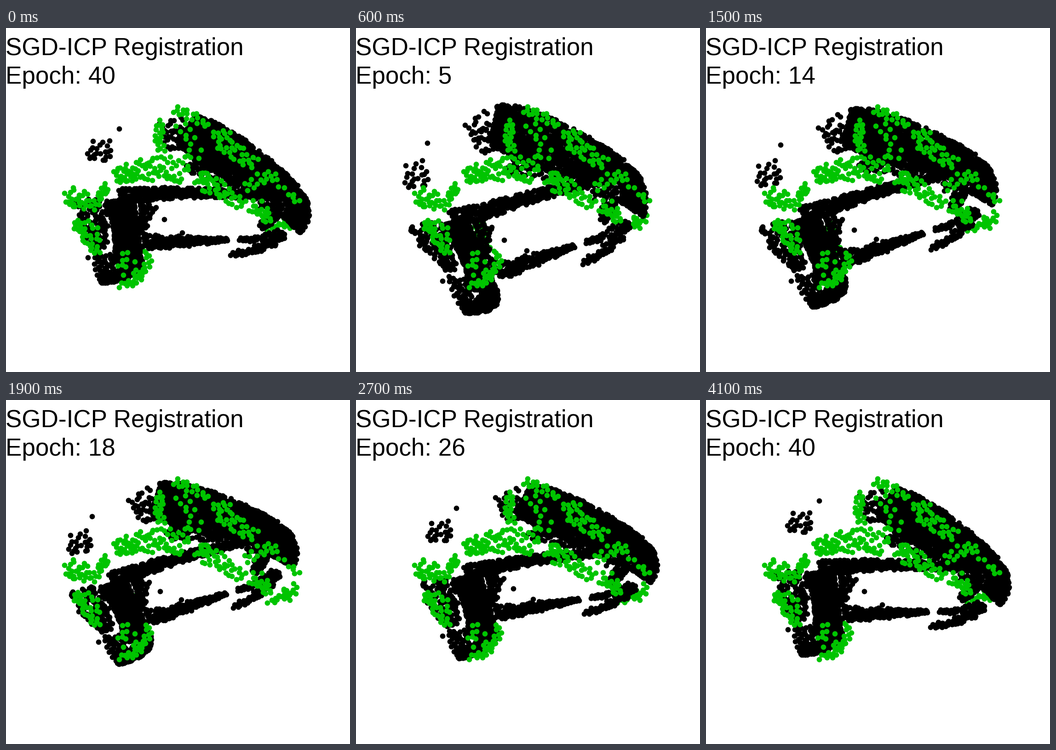
A matplotlib script for the animation above (4200 ms loop, 748 by 748 pixels).

```python
import numpy as np
import matplotlib.pyplot as plt
from matplotlib.animation import FuncAnimation

SIZE, DPI = 748, 100
LAST_EPOCH = 40
FRAMES, INTERVAL = LAST_EPOCH + 2, 100
GREEN = "#00c400"
PIVOT = np.array([400, 350])
GOLDEN = 0.618034
rng = np.random.default_rng(11)


def band(n, a, b, c, *widths):
    """Spread n points evenly over a ribbon through a, b and c.

    One half width holds throughout; three give it at a, b and c.
    """
    k = np.arange(n)
    t = (k + rng.random(n)) / n
    u = 2 * ((k * GOLDEN + 0.3 * rng.random(n)) % 1) - 1
    nodes = np.array([a, b, c], float)
    width = np.array(widths * 3 if len(widths) == 1 else widths, float)
    shape = np.column_stack([(1 - t) * (1 - 2 * t), 4 * t * (1 - t), t * (2 * t - 1)])
    slope = np.column_stack([4 * t - 3, 4 - 8 * t, 4 * t - 1]) @ nodes
    normal = slope[:, ::-1] * (1, -1) / np.hypot(*slope.T)[:, None]
    return shape @ nodes + normal * (u * (shape @ width))[:, None]


def depth(pts):
    """Only the lower left of the cloud stands out from the plane."""
    x, y = pts.T
    return 60 * np.clip((330 - x) / 150, 0, 1) * np.clip((y - 300) / 150, 0, 1)


# The moving cloud in its final pose
cloud = np.vstack([
    band(1400, (392, 219), (495, 283), (626, 361), 37, 47, 20),      # body
    band(45, (340, 237), (366, 231), (392, 225), 28, 32, 36),
    band(60, (400, 292), (450, 320), (560, 352), 18, 16, 8),
    band(550, (621, 362), (635, 396), (620, 428), 19, 25, 26),       # right end
    band(42, (552, 433), (575, 412), (602, 395), 10, 14, 16),
    band(18, (548, 386), (575, 386), (605, 385), 9),
    band(320, (245, 367), (400, 358), (600, 367), 19, 11, 9),        # ridge
    band(850, (246, 372), (260, 440), (264, 510), 32, 27, 30),       # column
    band(260, (278, 500), (264, 528), (206, 553), 16, 16, 3),        # foot
    band(58, (214, 490), (213, 522), (212, 548), 22, 20, 10),
    band(130, (184, 370), (190, 420), (206, 478), 35, 33, 14),       # flank
    band(42, (312, 380), (302, 405), (292, 448), 24, 14, 10),
    band(150, (297, 464), (380, 464), (482, 460), 16, 12, 3),        # strand
    band(55, (487, 491), (560, 475), (606, 447), 6, 9, 10),          # hook
    band(30, (505, 457), (550, 456), (600, 440), 4, 8, 10),
    band(22, (176, 280), (203, 264), (230, 262), 8, 26, 26),         # ear
    [(246, 219), (344, 416), (178, 499), (383, 445), (333, 208), (404, 315)],
])
lift = depth(cloud)

# The fixed cloud, in front of the moving one and behind it
front = np.vstack([
    band(18, (365, 175), (400, 190), (442, 212), 8, 11, 6),          # crown
    band(18, (340, 203), (332, 235), (341, 270), 9),
    band(11, (374, 208), (395, 238), (422, 282), 16),
    band(36, (464, 222), (490, 262), (545, 300), 16, 26, 16),
    band(80, (236, 322), (310, 306), (400, 308), 16, 26, 30),        # middle
    band(18, (220, 345), (205, 362), (190, 396), 10),
    band(28, (127, 372), (155, 370), (178, 390), 14, 24, 10),        # left
    band(36, (146, 430), (180, 445), (198, 492), 10, 22, 8),
    band(46, (415, 325), (455, 348), (518, 386), 14, 22, 12),        # right
    band(20, (530, 384), (555, 398), (572, 424), 14, 18, 8),
    band(16, (515, 345), (555, 328), (590, 326), 14),
    band(7, (594, 340), (620, 365), (636, 380), 6),
    band(26, (309, 485), (294, 540), (246, 560), 8),                 # foot
    band(11, (240, 500), (262, 510), (262, 545), 18),
])
back = np.vstack([
    band(22, (612, 405), (612, 424), (566, 436), 18, 14, 5),
    band(22, (260, 425), (278, 455), (290, 500), 15),
])

# epoch, turn in degrees, pivot x and y, stretch x and y, depth pull
POSES = np.array([
    (0, 16.5, 423, 445, 1.03, 1.267, -1),
    (5, 16.5, 354, 364, 1.03, 1.267, -1),
    (14, 16.5, 356, 351, 1.03, 1.13, -0.45),
    (17, 16.3, 370, 337, 0.99, 1.01, -0.28),
    (23, 16.3, 370, 336, 0.99, 1.01, -0.28),
    (26, 8, 389, 339, 1.008, 0.97, 0),
    (29, 0, 399.4, 349.7, 0.994, 0.994, 0),
    (34, 0, 399.4, 349.7, 0.994, 0.994, 0),
    (40, 0, 400, 350, 1, 1, 0),
])


def place(epoch):
    """Position of every moving point at an epoch."""
    turn, x, y, sx, sy, pull = (np.interp(epoch, POSES[:, 0], col)
                                for col in POSES.T[1:])
    c, s = np.cos(np.radians(turn)), np.sin(np.radians(turn))
    px, py = ((cloud - PIVOT) * (sx, sy)).T
    return x + c * px + s * py, y - s * px + c * py + pull * lift


fig = plt.figure(figsize=(SIZE / DPI, SIZE / DPI), dpi=DPI, facecolor="white")
ax = fig.add_axes([0, 0, 1, 1])
ax.set(xlim=(0, SIZE), ylim=(SIZE, 0))
ax.axis("off")


def dots(pts, color):
    return ax.plot(*pts.T, "o", ms=8.4, mew=0, color=color)[0]


def label(y, text):
    return ax.text(-1.5, y, text, family="Liberation Sans", size=53 * 72 / DPI,
                   color="black", va="baseline")


dots(back, GREEN)
moving = dots(cloud, "black")
dots(front, GREEN)
label(59, "SGD-ICP Registration")
counter = label(121, "")


def update(i):
    # The loop opens on the finished result, then runs from epoch 0
    epoch = i - 1 if i else LAST_EPOCH
    moving.set_data(*place(epoch))
    counter.set_text(f"Epoch: {epoch}")
    return moving, counter


anim = FuncAnimation(fig, update, frames=FRAMES, interval=INTERVAL,
                     repeat=True, repeat_delay=0)
plt.show()
```
